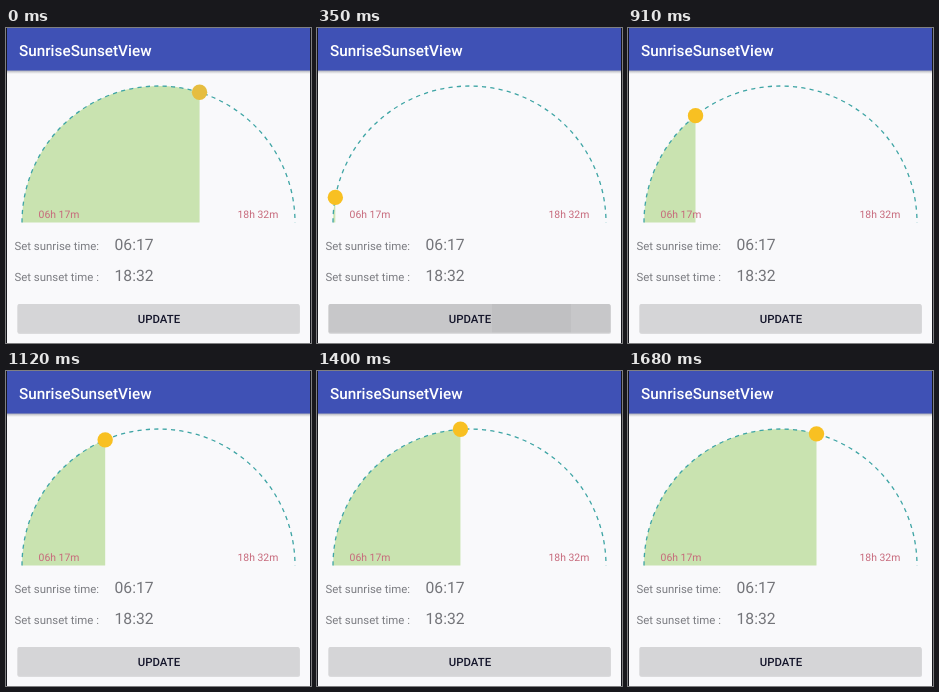
Recreate the animation shown at these times as an HTML page. Size 305 by 315 pixels, loop 1750 ms.

```html
<!DOCTYPE html>
<html lang="en">
<head>
<meta charset="utf-8">
<title>Sunrise and sunset</title>
<style>
html, body { margin: 0; width: 100%; height: 100%; overflow: hidden; background: #f9f9fb; }
svg { display: block; width: 100vw; height: 100vh; }
text { font-family: Roboto, "Open Sans", sans-serif; text-rendering: geometricPrecision; }
.title { font-size: 15.3px; font-weight: 500; fill: #fff; }
.label { font-size: 11.4px; fill: #7c7d82; }
.value { font-size: 15.7px; fill: #74757a; }
.hour { font-size: 10.4px; fill: #c76a7c; }
.button { font-size: 11.4px; font-weight: 500; fill: #14152a; text-anchor: middle; }
</style>
</head>
<body>
<svg viewBox="0 0 305 315">
  <defs>
    <linearGradient id="shade" x2="0" y2="1">
      <stop offset="0" stop-color="#555a70" stop-opacity=".55"/>
      <stop offset="1" stop-color="#888" stop-opacity="0"/>
    </linearGradient>
  </defs>
  <rect width="305" height="315" fill="#f9f9fb"/>
  <rect y="42" width="305" height="4" fill="url(#shade)"/>
  <rect width="305" height="42.5" fill="#3f51b5"/>
  <text class="title" x="13" y="28">SunriseSunsetView</text>

  <path id="day" fill="#c9e3b0"/>
  <path id="track" fill="none" stroke="#3fa5a5" stroke-width="1.3" stroke-dasharray="4.2"/>
  <circle id="sun" r="7.7"/>
  <text class="hour" x="32.6" y="190">06h 17m</text>
  <text class="hour" x="231.5" y="190">18h 32m</text>

  <text class="label" x="8.5" y="222">Set sunrise time:</text>
  <text class="value" x="108.5" y="222">06:17</text>
  <text class="label" x="8.5" y="252.6">Set sunset time :</text>
  <text class="value" x="108.5" y="253">18:32</text>

  <rect x="11.5" y="277" width="282.5" height="29" rx="2" fill="#000" opacity=".12"/>
  <rect x="11.5" y="276" width="282" height="28.7" rx="1.5" fill="#d5d5d7"/>
  <rect id="press" x="11.5" y="276" width="282" height="28.7" rx="1.5" fill="#000"/>
  <rect id="ripple" x="175" y="276" width="79" height="28.5" fill="#000"/>
  <text class="button" x="153" y="294.5">UPDATE</text>
  <rect width="1" height="315" fill="#15161c"/>
  <rect x="304" width="1" height="315" fill="#15161c"/>
</svg>
<script>
const LOOP = 1750, STEP = 70;
const CX = 152.5, BASE = 194.5, R = 136.5;
const START = 200, FINAL = 107.5;
const $ = id => document.getElementById(id);
const sun = $('sun'), day = $('day'), press = $('press'), ripple = $('ripple');

// [time in ms, degrees travelled from the sunrise end]
const travel = [[0, FINAL], [START - 1, FINAL], [START, 0], [350, 10.6], [630, 32.4],
  [910, 51.5], [1120, 67], [1400, 86.2], [1680, 105.3], [1712, FINAL], [LOOP, FINAL]];
const pressed = [[0, 0], [70, 0.01], [210, 0.07], [350, 0.065], [630, 0.025], [910, 0], [LOOP, 0]];

function at(keys, t) {
  const i = Math.max(1, keys.findIndex(k => k[0] >= t));
  const [t0, a] = keys[i - 1], [t1, b] = keys[i];
  return a + (b - a) * (t - t0) / (t1 - t0);
}

function draw(t) {
  const angle = at(travel, t) * Math.PI / 180;
  const x = CX - R * Math.cos(angle), y = BASE - R * Math.sin(angle);
  sun.setAttribute('cx', x);
  sun.setAttribute('cy', y);
  sun.setAttribute('fill', t < START ? '#e6bd40' : '#f8c022');
  day.setAttribute('d', `M${CX - R} ${BASE}A${R} ${R} 0 0 1 ${x} ${y}V${BASE}Z`);
  press.setAttribute('opacity', at(pressed, t));
  ripple.setAttribute('opacity', t >= 210 && t < 490 ? 0.035 : 0);
}

$('track').setAttribute('d', `M${CX - R} ${BASE}A${R} ${R} 0 0 1 ${CX + R} ${BASE}`);
const begin = performance.now();
function tick() {
  const t = (performance.now() - begin) % LOOP;
  draw(Math.floor(t / STEP) * STEP);
  requestAnimationFrame(tick);
}
tick();
</script>
</body>
</html>
```
